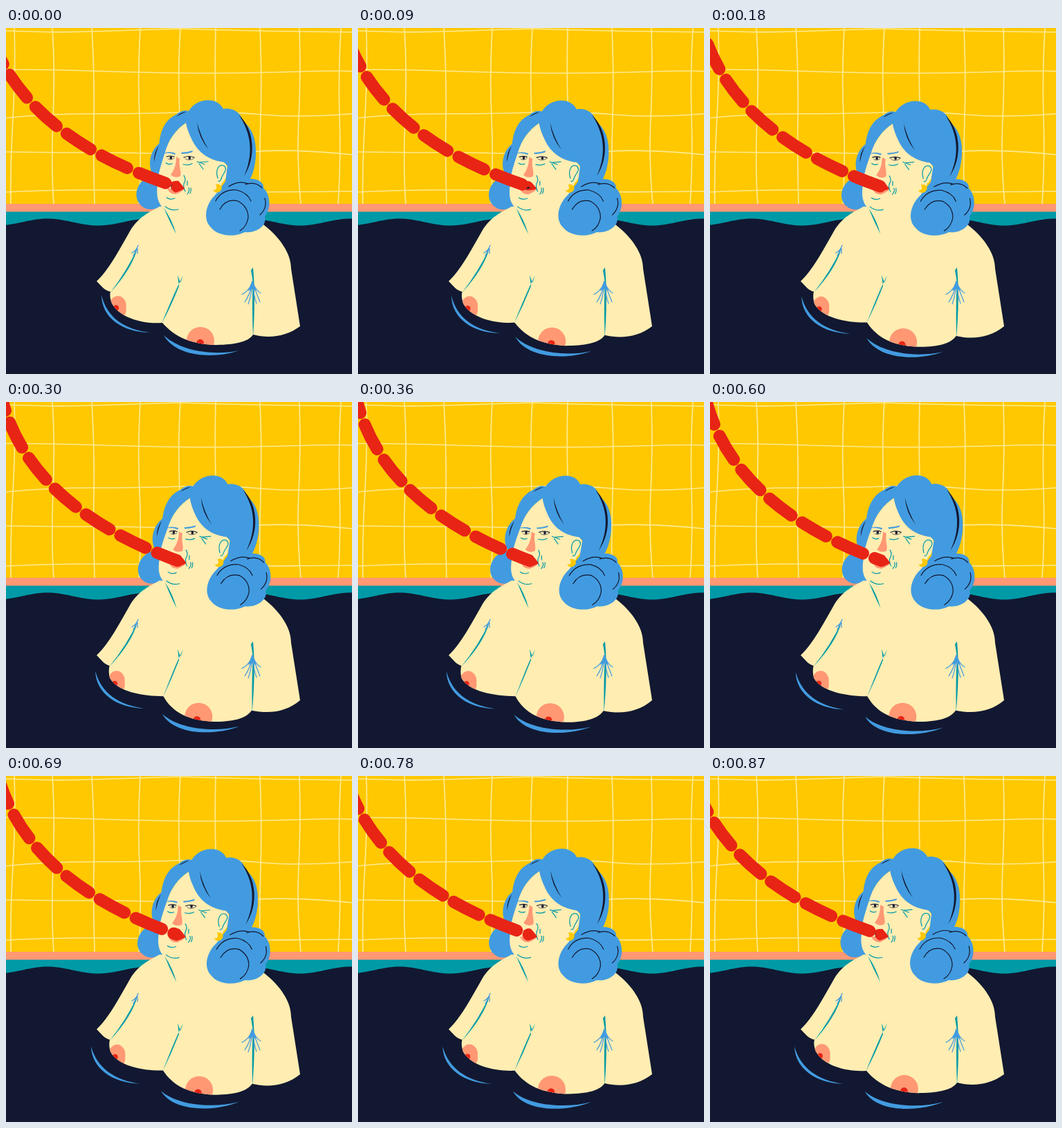
An HTML page for the animation above (0.9 s loop, 500x500 px).

```html
<!DOCTYPE html>
<html lang="en">
<head>
<meta charset="utf-8">
<title>Pool lunch</title>
<style>
  html, body { margin: 0; width: 100%; height: 100%; overflow: hidden; background: #121831; }
  svg { display: block; width: 100vw; height: 100vh; }
  .skin { fill: #ffedb2; } .blue { fill: #429be0; } .teal { fill: #009aa6; }
  .navy { fill: #121831; } .red { fill: #e82415; } .coral { fill: #ff9873; }
  .line { fill: none; stroke: #009aa6; stroke-width: 1.2; stroke-linecap: round; }
  .ink { stroke: #121831; } .hair { stroke: #429be0; }
  .grid { fill: none; stroke: #ffeb91; stroke-width: 1.7; }
</style>
</head>
<body>
<svg viewBox="0 0 500 500">
  <defs>
    <clipPath id="body"><path id="torso" data-d="M131 366C150 348 165 318 180 292C192 273 207 266 222 258L300 262L372 284C395 302 412 325 412 348L425 431C405 446~449 380 449~452 357~354 443~447C350~345 455~460 325 458~464 300 458~464C268~262 456~462 245~239 448~450 226~228 426~425C200~195 428~424 165~160 420~418 153~149 398~400C150~147 390~392 150~148 385 151~149 381C143 380 137 372 131 366Z"/></clipPath>
    <clipPath id="mouth"><path d="M-150-150H230L237 208Q251 222 258 232Q250 237 240 239L200 262H-150Z"/></clipPath>
  </defs>

  <path fill="#ffc800" d="M0 0H500V256H0Z"/>
  <path class="grid" d="M0 4Q70 7 126 5T252 1Q340 4 424 5T500 6M0 60Q70 60 126 62T252 65T424 63T500 66M0 130Q60 124 126 124T252 122T368 125T500 124M0 179Q70 180 126 180T240 182T352 179T500 183M0 237Q60 234 126 234T252 236T500 236
    M12 0Q14 60 10 130T7 255M67 0Q71 60 68 130T69 255M124 0Q128 70 127 130T128 255M194 0Q190 70 193 130T192 255M252 0Q248 60 251 130V255M303 0Q301 70 304 130T302 255M367 0Q370 70 368 130T367 255M424 0Q426 70 423 130T426 255M484 0Q480 70 482 130T480 255"/>
  <path class="coral" d="M0 254H500V266H0Z"/>
  <path class="teal" d="M0 265.500H500V300H0Z"/>
  <path class="navy" id="water"/>

  <g class="head"><path class="blue" d="M224 165C207 176 204 200 213 213C188 218 181 246 197 258C206 266 220 261 232 254L240 170Z"/></g>
  <use href="#torso" class="skin"/>
  <g clip-path="url(#body)">
    <path class="coral" data-d="M261~257 452~456a20 20 0 1 1 40 0a20 20 0 1 1 -40 0M150~147 404~406a12 14 0 1 1 23.500 0a12 14 0 1 1 -23.500 0"/>
    <path class="red" data-d="M275.500~268.500 455~461a5.200 5.200 0 1 1 10.400 0a5.200 5.200 0 1 1 -10.400 0M155~152 404.500~408a4 4 0 1 1 8 0a4 4 0 1 1 -8 0"/>
  </g>
  <path class="teal" data-d="M190 318Q182 348 151~149 382Q174 352 190 318M256 358Q248 371 225~228 427~426Q239 401 250 373L248 357L252 368ZM357 346Q361 390 357~355 446~449Q355 395 357 368L354 350Z"/>
  <path class="line hair" d="M191 314Q189 321 182 325M190 317L184 329M190 319V326M356 368Q351 380 341 385M356 370Q352 386 345 396M356 372Q354 388 350 399M357 370Q358 388 362 398M357 369Q362 380 368 383M357 370Q363 386 367 396"/>
  <path class="blue" d="M356 364L350 380L356 377L362 380Z"/>

  <g class="head">
    <path class="skin" d="M260 137C246 146 234 162 229 182C225 195 219 212 219 226C217 242 219 252 227 260L232 275L296 290L312 224C322 216 323 198 314 193C290 192 270 172 260 137Z"/>
    <path class="blue" d="M222 190C218 155 228 133 246 125Q255 117 264 120C275 101 305 98 314 117C330 114 342 126 341 134C358 145 362 165 361 185C360 200 357 210 353 218C368 218 373 226 372 231C383 242 383 262 374 272C378 285 362 297 345 295C330 303 306 301 296 288C287 279 286 262 298 246Q304 240 307 235L317 222L320 199L315 194C295 191 278 182 268 160Q262 148 260 137C246 146 234 162 229 182Z"/>
    <path class="navy" d="M276 136Q278 158 293 176Q281 157 276 136M336 125C358 145 363 185 344 214C358 183 355 152 336 125M246 128Q252 122 261 121Q253 124 246 128M221 170Q213 180 214 194Q216 180 221 170"/>
    <path class="line ink" stroke-width="1.600" d="M303 250Q312 233 333 234Q349 238 354 250M309 262Q318 246 335 250Q350 258 350 274Q348 287 338 293M322 229Q336 220 350 225M346 226Q360 221 370 231M374 246Q378 260 367 270"/>
    <path class="line" stroke-width="1.500" d="M306 217C302 204 308 196 315 199C322 205 312 211 311 218Q309 223 307 221"/>
    <path fill="#ffc800" d="M303 226C312 224 315 233 308 237Q302 239 299 234Q307 235 303 226"/>

    <path class="blue" d="M230 180Q238 178 245 181L244 183Q237 180 230 181M253 180Q261 180 270 177L269 179.500Q261 182 254 182Z"/>
    <path class="line ink" d="M232 186Q238 184 243 186M257 187Q264 184 272 187"/>
    <path class="line ink" style="stroke-width:.6" d="M234 189Q238 192 243 188M259 189Q265 193 272 188"/>
    <path class="navy" d="M236.500 187.500a1.800 2.200 0 1 1 3.600 0a1.800 2.200 0 1 1 -3.600 0M263.500 187.800a1.800 2.200 0 1 1 3.600 0a1.800 2.200 0 1 1 -3.600 0"/>
    <path class="coral" d="M246 186L251 189C249 199 254 207 252 214Q244 218 238 212C244 204 246 196 246 186M233 232Q237 241 246 240Q254 237 258 232Z"/>
    <path class="red" d="M238 223Q246 219 250 223L258 232Q248 236 239 233Z"/>
    <path class="navy" d="M238 226L249 231L239 233Z"/>
    <path class="line" d="M231 195Q235 198 240 196M256 197Q263 199 269 196M276 193L287 197M279 196L285 204M280 194L292 193M257 213Q261 219 257 225Q256 231 259 236M262 221V227M264 231Q266 235 262 240M267 231Q268 235 266 239M232 245Q237 249 244 246M230 258Q239 265 249 262"/>
    <path class="teal" d="M228 260Q240 277 246 298Q236 279 228 260"/>
    <g clip-path="url(#mouth)">
      <path id="chain" fill="none" stroke="#e82415" stroke-width="17.600" stroke-linecap="round" stroke-dasharray="41.300 18.200" d="M252 231Q11.250 156 -31.500 -18"/>
    </g>
  </g>

  <path class="blue" data-drift="M138~122 386~391C138~123 418~422 168~152 440~444 208~193 440~445C172~157 436~440 146~131 419~423 138~122 386~391M228~224 444~456C245~240 475~485 300~298 479~487 337 466~471C300 474~481 252~248 467~477 228~224 444~456"/>
</svg>
<script>
const $ = id => document.getElementById(id);
const all = query => [...document.querySelectorAll(query)];
const LOOP = 900, STEP = 30, PITCH = 59.5;

// [time, value] pairs, joined by straight segments
const SWAY = [[0, 0], [60, 0.1], [180, 0.47], [300, 0.68], [480, 1], [600, 0.67], [780, 0.25], [870, 0.03], [900, 0]];
const PULL = [[0, 0], [60, 0.06], [180, 0.24], [300, 0.41], [480, 0.63], [600, 0.77], [780, 0.96], [870, 1], [900, 1]];

function sample(keys, t) {
  const i = Math.max(1, keys.findIndex(([time]) => time >= t));
  const [t0, a] = keys[i - 1], [t1, b] = keys[i];
  return a + (b - a) * (t - t0) / (t1 - t0);
}

// "a~b" in a path is a number that travels from a to b
const mix = (path, k) => path.replace(/(-?[\d.]+)~(-?[\d.]+)/g, (_, a, b) => (+a + (b - a) * k).toFixed(2));

let surface = 'M0 500';
for (let x = 0; x <= 500; x += 5) surface += `L${x} ${280.5 - 5 * Math.cos((x - 60) * Math.PI / 73)}`;
$('water').setAttribute('d', surface + 'V500Z');

const heads = all('.head'), flesh = all('[data-d]'), ripples = all('[data-drift]');

function draw(now) {
  let t = Math.floor(now % LOOP / STEP) * STEP;
  if ([30, 210, 570].includes(t)) t -= STEP; // held poses
  const sway = sample(SWAY, t), drift = 1 - (1 - t / LOOP) ** 2;
  const skew = 0.048 * sway, dip = 0.014 * sway;
  for (const head of heads)
    head.setAttribute('transform', `matrix(1 0 ${-skew} ${1 - dip} ${312 * skew} ${312 * dip})`);
  for (const el of flesh) el.setAttribute('d', mix(el.dataset.d, sway));
  for (const el of ripples) el.setAttribute('d', mix(el.dataset.drift, drift));
  $('chain').setAttribute('transform', `rotate(${3.3 * sway} 252 231)`);
  $('chain').setAttribute('stroke-dashoffset', PITCH * sample(PULL, t) - 22.5);
  requestAnimationFrame(draw);
}
draw(0);
</script>
</body>
</html>
```
